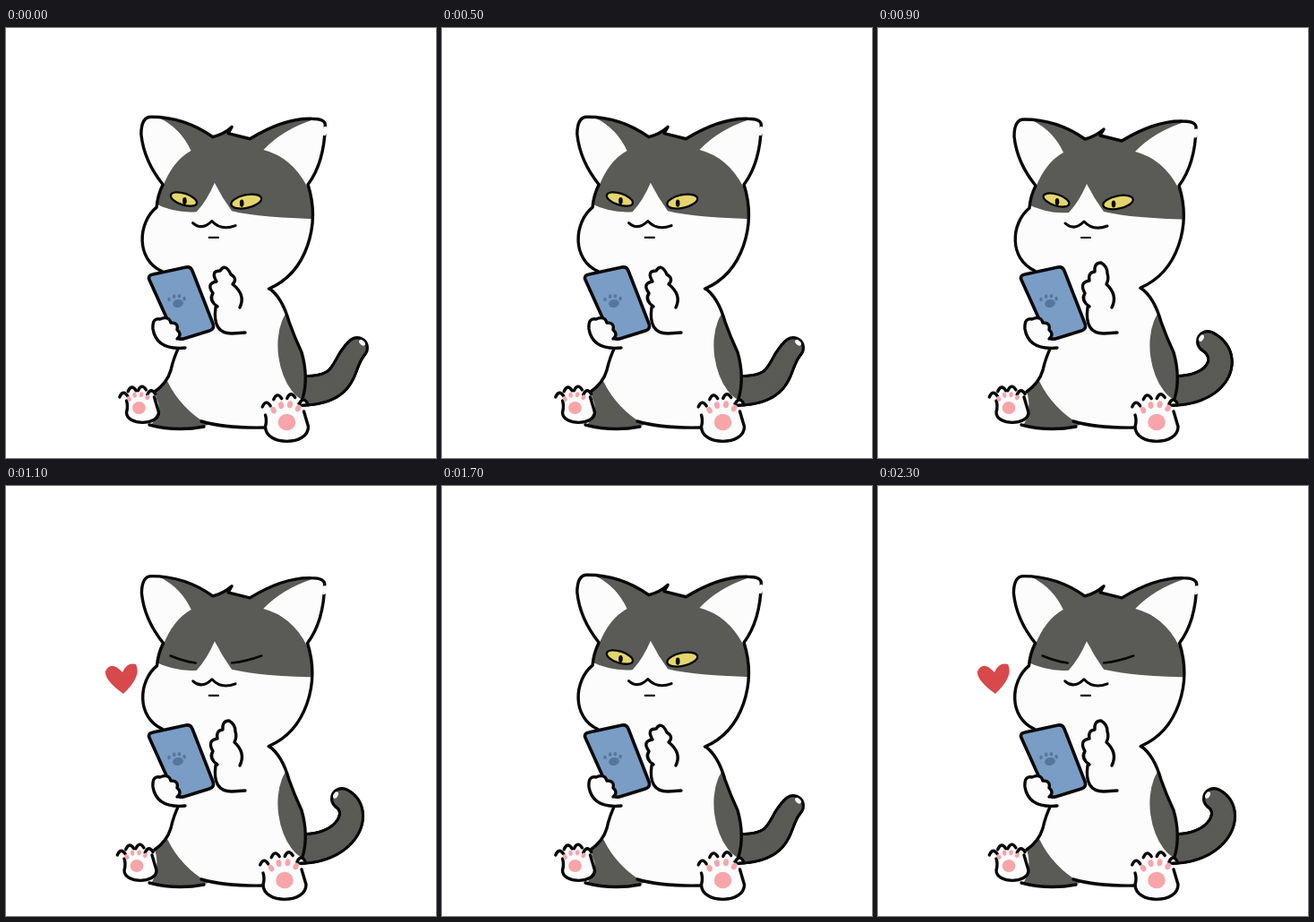
An HTML page for the animation above (2.4 s loop, 480 by 480 pixels).

```html
<!DOCTYPE html>
<html lang="en">
<head>
<meta charset="utf-8">
<title>Cat with a phone</title>
<style>
html, body { margin: 0; width: 100%; height: 100%; overflow: hidden; background: #fff; }
svg { display: block; width: 100vw; height: 100vh; }
path { stroke-linecap: round; stroke-linejoin: round; }
</style>
</head>
<body>
<svg id="stage" viewBox="0 0 480 480"></svg>
<script>
const INK = '#080808', FUR = '#5a5a56', WHITE = '#fcfcfc', PINK = '#f8a5aa';
const BLUE = '#7a9dc5', NAVY = '#56779d', YELLOW = '#e4d66c';
const STEP = 100;
const TIMELINE = 'ABAMBABAMBDC';

const shape = (d, color, edge = 0) =>
  `<path d="${d}" fill="${color}" stroke="${INK}" stroke-width="${edge}"/>`;
const line = (d, width = 3.4) => shape(d, 'none', width);
const oval = (x, y, rx, ry, color, turn = 0, edge = 0) =>
  `<ellipse cx="${x}" cy="${y}" rx="${rx}" ry="${ry}" fill="${color}" stroke="${INK}"
    stroke-width="${edge}" transform="rotate(${turn} ${x} ${y})"/>`;
const group = (move, content) => `<g transform="${move}">${content}</g>`;
const clip = (id, content) => `<g clip-path="url(#${id})">${content}</g>`;
const loop = (n, draw) => Array.from({ length: n }, (_, i) => draw(i)).join('');

const HEAD = 'M175 271C146 258 148 218 169 201Q170 188 176 176Q155 150 152 121Q152 102 163 102' +
  'Q200 102 231 124Q243 121 252 113L248 120L272 126Q310 103 340 104Q356 104 355 112' +
  'Q354 152 336 176C350 220 335 272 293 290';
const BODY = 'M175 265L194 354Q186 383 177 395L150 430L165 444Q195 450 222 441Q250 447 290 446' +
  'L331 414Q338 390 330 362Q322 345 316 328Q308 300 293 290Z';

// Tapered tail: circles along a cubic whose far end swings.
function tail(bend, tip) {
  const p = [[330, 405], [383, 404], bend, tip], n = 40;
  const at = (t, k) => (1 - t) ** 3 * p[0][k] + 3 * t * (1 - t) ** 2 * p[1][k] +
    3 * t * t * (1 - t) * p[2][k] + t ** 3 * p[3][k];
  const tube = (grow, color) => loop(n + 1, i =>
    oval(at(i / n, 0), at(i / n, 1), 17 - 5 * i / n + grow, 17 - 5 * i / n + grow, color));
  const angle = Math.atan2(tip[1] - bend[1], tip[0] - bend[0]);
  return tube(1, INK) + tube(-2.2, FUR) +
    oval(tip[0] + 8 * Math.cos(angle), tip[1] + 8 * Math.sin(angle), 2.5, 4, WHITE, angle * 180 / Math.PI);
}

function body() {
  return shape(BODY, WHITE) +
    clip('torso', oval(335, 363, 31, 55, FUR, -8)) +
    shape('M166 406L180 394Q195 425 226 443Q190 452 163 442Q172 425 166 406Z', FUR) +
    line('M194 354Q187 368 184 382Q180 396 166 406') +
    line('M293 290Q308 300 316 328Q322 345 330 362Q338 390 331 414') +
    line('M160 443Q190 451 221 445M218 439Q245 447 289 446');
}

// Sole with four beans and hooked toes fanned around the pad.
function foot(x, y, size, lean) {
  const place = (a, r) => [x + r * size * Math.cos(a), y + r * size * Math.sin(a)];
  const cx = x + lean, rx = size * 1.2, ry = size * 1.12;
  return oval(cx, y - 1, rx, ry, WHITE) +
    line(`M${cx - rx} ${y - 8}Q${cx - rx + 2} ${y - 2} ${cx - rx} ${y + 5}` +
      `C${cx - rx} ${y + ry * 1.2} ${cx + rx} ${y + ry * 1.2} ${cx + rx} ${y + 5}L${cx + rx - 5} ${y - 12}`) +
    loop(4, i => {
      const a = (-138 + 29 * i) * Math.PI / 180;
      const [bx, by] = place(a, 1), [tx, ty] = place(a, 1.5);
      const hook = `M${tx - 5} ${ty + 3}Q${tx - 1} ${ty - 6} ${tx + 4} ${ty + 2}`;
      return shape(hook, WHITE) + line(hook) +
        oval(bx, by, size * .15, size * .2, PINK, -25 + 17 * i);
    }) +
    oval(x, y, size * .49, size * .46, PINK);
}

function phone() {
  return shape('M164 275L201 267Q206 266 208 271L231 330Q233 336 227 338L198 347Q190 348 188 343L160 281Q158 276 164 275Z', BLUE, 3.6) +
    oval(192, 307.5, 6, 4.5, NAVY, -12) +
    loop(4, i => oval(182 + 5.7 * i, 304 - 5 * Math.sin(.2 + i * .85), 1.8, 2.3, NAVY));
}

const holdingPaw = () =>
  shape('M200 357Q168 360 164 336Q163 323 172 325Q182 321 184 329Q193 329 191 337Q197 342 191 347', WHITE, 3.4);

function freeHand(thumbUp) {
  const knuckles = thumbUp
    ? 'Q224 284 236 282Q234 273 242 272Q241 262 249 262Q256 266 256 274Q258 280 255 286'
    : 'Q223 285 235 283Q228 271 239 271Q245 262 251 275Q259 280 253 286';
  const hand = `M236 311Q226 304 231 296${knuckles}Q268 298 261 312`;
  const arm = 'M234 312Q230 341 252 341L267 340';
  return shape(hand + 'L267 340Q230 344 236 311Z', WHITE) + line(hand) + line(arm);
}

function eye(x, y, size, turn, look) {
  return oval(x, y, size, size * .42, YELLOW, turn, 2.3) +
    oval(x + look, y + 2, 2.3, 4, INK);
}

function head(open) {
  return shape(HEAD, WHITE) +
    clip('skull',
      shape('M140 90H360V214Q285 213 252 205Q241 190 233 174Q225 193 213 206Q190 208 165 196L140 190Z', FUR) +
      shape('M148 104L172 103Q196 115 207 139Q187 150 176 178L140 170Z', WHITE) +
      shape('M287 138Q308 116 342 105H365V180L335 178Q318 146 287 138Z', WHITE)) +
    line(HEAD) +
    `<path d="M355 115L354 120" stroke="${WHITE}" stroke-width="5"/>` +
    (open
      ? eye(199, 192, 15, 18, 1) + eye(268, 194.5, 17, -12, -5)
      : line('M184 190Q198 196 212 198M252 198Q269 196 285 190', 2.5)) +
    line('M209 218Q219 227 230 216Q240 227 256 221', 3) +
    line('M227 234H237', 2.2);
}

const heart = () => shape('M131 232Q110 217 111 207Q117 194 130 208Q135 196 145 199Q152 212 131 232Z', '#d8494c');

function pose({ bend, tip, thumbUp = true, stretch = 0, step = 0, open = true, love = false }) {
  const grow = `translate(247 240) scale(${1 + stretch * .6} ${1 + stretch}) translate(-247 -240)`;
  return tail(bend, tip) + body() +
    group(`translate(${step})`, foot(146, 424, 15, 4) + foot(311, 440, 20, 0)) +
    group(grow, head(open)) +
    phone() + holdingPaw() + freeHand(thumbUp) +
    (love ? heart() : '');
}

const out = { bend: [372, 378], tip: [392, 357], thumbUp: false, stretch: .02, step: 2.5 };
const curl = { bend: [395, 365], tip: [368, 350] };
const high = { bend: [398, 362], tip: [375, 349], stretch: .01 };
const happy = { open: false, love: true };
const POSES = { A: out, B: curl, M: high, D: { ...out, ...happy }, C: { ...high, ...happy } };

const stage = document.getElementById('stage');
stage.innerHTML =
  `<defs><clipPath id="skull"><path d="${HEAD}"/></clipPath><clipPath id="torso"><path d="${BODY}"/></clipPath></defs>` +
  Object.entries(POSES).map(([key, p]) => `<g id="pose${key}" visibility="hidden">${pose(p)}</g>`).join('');

const start = performance.now();
let shown = '';
function show(now) {
  const key = TIMELINE[Math.floor(Math.max(0, now - start) / STEP) % TIMELINE.length];
  if (key !== shown) {
    if (shown) document.getElementById('pose' + shown).setAttribute('visibility', 'hidden');
    document.getElementById('pose' + key).setAttribute('visibility', 'visible');
    shown = key;
  }
  requestAnimationFrame(show);
}
show(start);
</script>
</body>
</html>
```
